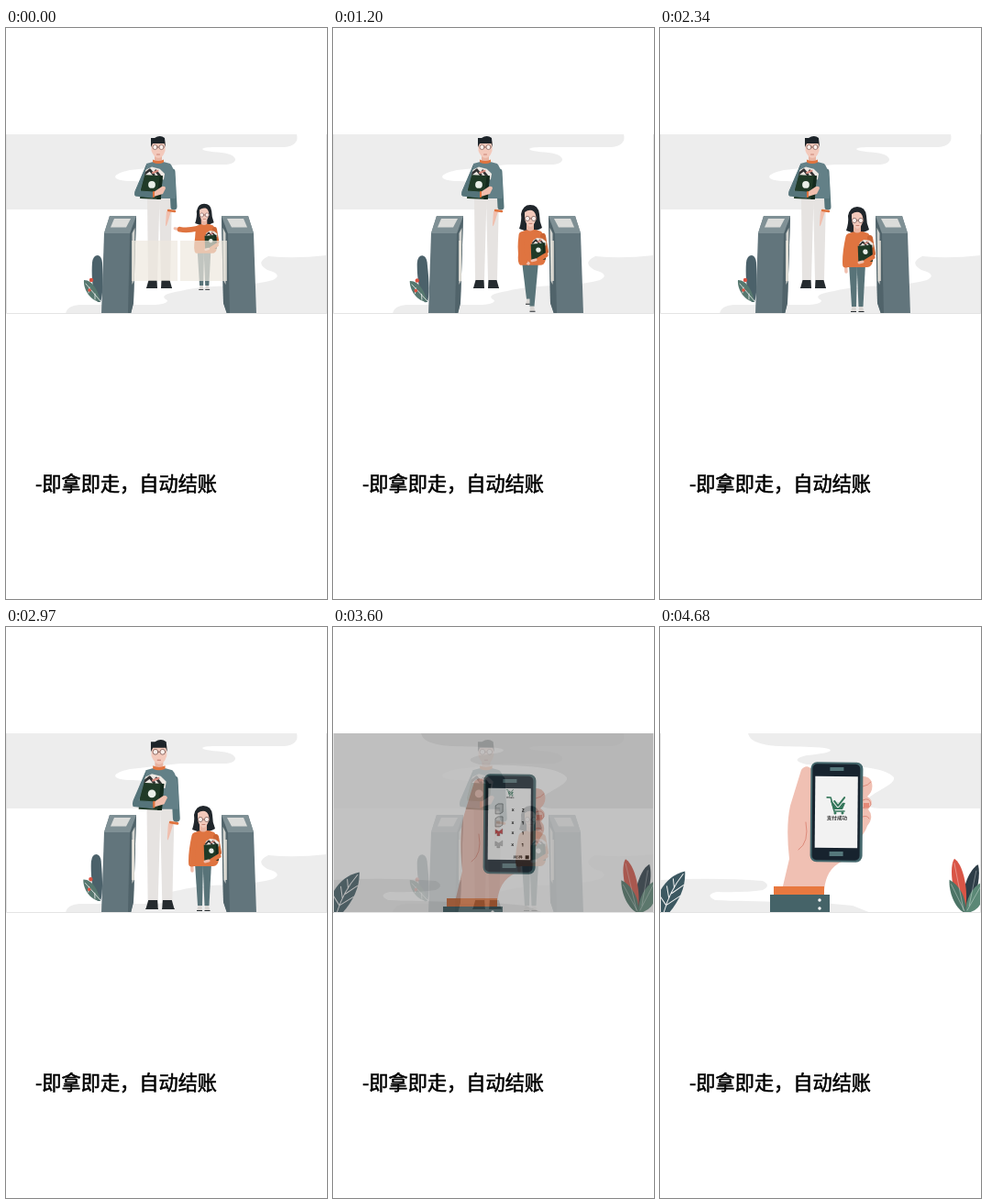
These frames come from a looping animation (350x623 px, 4740 ms). An HTML page:

```html
<!DOCTYPE html>
<html lang="zh-CN">
<head>
<meta charset="utf-8">
<style>
html, body { margin: 0; width: 100%; height: 100%; overflow: hidden; background: #fff }
svg { display: block; width: 350px; height: 623px }
.line { fill: none; stroke-linecap: round; stroke-linejoin: round }
.caption { font: 500 21.2px "Noto Sans CJK SC", "Noto Sans CJK", sans-serif; stroke: #000; stroke-width: .55 }
.tiny { font: 700 5.6px "Noto Serif", "Noto Sans CJK SC", serif; text-anchor: middle }
.count { font: 700 5px "Noto Sans", sans-serif; text-anchor: middle }
</style>
</head>
<body>
<svg viewBox="0 0 350 623">
<defs>
  <clipPath id="view"><rect y="116" width="350" height="196"/></clipPath>
  <g id="bag">
    <path d="M-9-10l3-6 6-3 8 2 5 5-1 6z" fill="#eee9e4"/>
    <path d="M-7-12l5-4 4 5M4-15l4 5" class="line" stroke="#333" stroke-width="2.5"/>
    <path d="M1-13l5-2" class="line" stroke="#d88c80" stroke-width="2"/>
    <path d="M-10-11l21 1-2 24-21-1z" fill="#203a27"/>
    <path d="M8-10h3l-2 24h-4z" fill="#142a1d"/>
    <circle cy="-1" r="3.6" fill="#e9eee8"/>
  </g>
  <g id="glasses" class="line" stroke="#86625c" stroke-width=".8">
    <circle cx="-3.5" r="2.6" fill="#fff" fill-opacity=".7"/><circle cx="3.5" r="2.6" fill="#fff" fill-opacity=".7"/><path d="M-.9 0h1.8"/>
  </g>
</defs>

<g clip-path="url(#view)">
  <rect y="116" width="350" height="196"/>

  <g id="store">
    <rect y="116" width="350" height="196" fill="#fff"/>
    <g fill="#ededed">
      <path d="M0 116H317Q320 128 304 130H225C205 131 215 135 235 136C255 138 254 149 238 149H190C170 151 155 153 135 155C112 160 115 167 138 167Q170 168 175 180L170 198H0z"/>
      <path d="M350 248Q315 252 286 249Q271 256 285 264Q303 269 291 275C265 283 223 279 190 287Q164 291 176 297Q176 302 158 302H80Q66 303 65 312H350z"/>
    </g>
    <g id="plant">
      <path d="M100 299C94 290 93 268 94 256Q95 248 100 248Q105 249 105 258C106 275 106 290 103 299z" fill="#4b616a"/>
      <path d="M103 299C92 298 84 285 85 275C95 275 101 288 103 299z" fill="#56786f"/>
      <path d="M87 279L103 298M90 289l1-6M97 296v-6" class="line" stroke="#eee" stroke-width=".8"/>
      <circle cx="93" cy="275" r="2.2" fill="#dd5140"/><circle cx="91" cy="286" r="1.8" fill="#dd5140"/>
    </g>
    <g>
      <path d="M113 205H142L139 300 136 312H104L107 224z" fill="#62757c"/>
      <path d="M135 224L142 205 139 300 136 312H133z" fill="#50636a"/>
      <path d="M113 205H142L135 224H107z" fill="#7f9095"/>
      <path d="M118 208H136L131 217.5H114z" fill="#dbdcda"/>
      <path d="M137.5 224l3-6-1 58-2 4z" fill="#d2d3cf"/>
      <path d="M235 205H264L270 224 273 312H241L237 300z" fill="#62757c"/>
      <path d="M235 205L242 224 244 312H241L237 300z" fill="#50636a"/>
      <path d="M235 205H264L270 224H242z" fill="#7f9095"/>
      <path d="M241 208H259L263 217.5H246z" fill="#dbdcda"/>
      <path d="M236.5 218l3 6v56l-2-4z" fill="#d2d3cf"/>
    </g>

    <g id="man">
      <g id="manLegs" fill="#e6e3e1"></g>
      <path d="M181 157L183 195" class="line" stroke="#55747a" stroke-width="7"/>
      <path d="M180 200l-4 13q-2 6-2 1l1-14z" fill="#f0bfae"/>
      <path d="M177 199l7 1" class="line" stroke="#e0743f" stroke-width="2.5"/>
      <path d="M153 148Q166 143 179 148Q186 155 185 186H152L150 164z" fill="#638087"/>
      <path d="M162 138h8v7q-4 3-8 0z" fill="#e9b4a2"/>
      <path d="M160 143.5q6 3 12 0v3q-6 3-12 0z" fill="#e0743f"/>
      <path d="M158.500 124H173.500V134Q171 142 166 142Q161 141 158.500 134z" fill="#f3c9bb"/>
      <path d="M158 130V120L162 120Q168 116 173 120L174 130 172.500 126 160 126z" fill="#1d2429"/>
      <use href="#glasses" x="166" y="130"/>
      <path d="M164.500 138h3" class="line" stroke="#bd7063" stroke-width=".8"/>
      <use href="#bag" transform="translate(159 172) scale(1.08)"/>
      <path d="M153 150L150 163 146 178 160 179V185L141 183Q140 181 141 178z" fill="#55747a" stroke="#55747a" stroke-linejoin="round"/>
      <path d="M161 179l9-6q4-1 4 2l-3 6-10 3z" fill="#f0bfae"/>
      <path d="M161 179v5" class="line" stroke="#e0743f" stroke-width="2"/>
    </g>

    <g id="girl">
      <g id="girlLegs" fill="#587378"></g>
      <path d="M203 221Q206 212 205 205Q207 195 215 195Q224 195 225 205Q225 213 228 220Q216 227 203 221z" fill="#20262b"/>
      <path d="M204 225Q215 219 227 224Q234 231 232 254Q231 261 226 261H204Q200 258 203 240z" fill="#df7440"/>
      <path d="M211 215h8v7q-4 3-8 0z" fill="#eab5a3"/>
      <path d="M209 203Q213 200 217 201Q221.500 203 221.500 210Q219 219 215 219Q210 217 209 209z" fill="#f3c9bb"/>
      <use href="#glasses" x="215.5" y="210"/>
      <path d="M214 215.500h3" class="line" stroke="#bd7063" stroke-width=".8"/>
      <path d="M229 229L232 246" class="line" stroke="#cc6534" stroke-width="6"/>
      <use href="#bag" transform="translate(224 245) rotate(-7) scale(.74)"/>
      <path d="M232 250L224 255" class="line" stroke="#df7440" stroke-width="5"/>
      <path d="M221 255l-4 1" class="line" stroke="#f0bfae" stroke-width="3"/>
      <path id="hand" class="line" stroke="#f0bfae" stroke-width="3.5"/>
      <path id="sleeve" class="line" stroke="#df7440" stroke-width="7"/>
    </g>

    <g fill="#eee9df" fill-opacity=".7">
      <rect id="doorL" x="137" y="232" height="44"/>
      <rect id="doorR" y="232" height="44"/>
    </g>
  </g>

  <g id="pay">
    <rect y="116" width="350" height="196" fill="#fff"/>
    <g fill="#ededed">
      <path d="M96 116H350V198H240Q222 198 226 188C236 178 257 172 255 164C245 153 215 151 160 150Q139 145 160 140C192 137 195 132 165 131C135 130 99 132 96 116z"/>
      <path d="M0 276Q60 273 112 277Q122 282 112 287Q92 290 62 289Q48 292 60 298C100 300 170 299 210 304L230 312H0z"/>
    </g>
    <g id="leafL">
      <path d="M0 312V289Q10 271 28 267Q29 290 10 312z" fill="#3c5861"/>
      <path d="M4 312Q11 288 26 270M10 296L8 283M16 285L15 275M7 304L0 293M8 303L22 294M13 291L26 282" class="line" stroke="#f3f3f3"/>
    </g>
    <g id="leafR">
      <path d="M333 312C325 300 333 266 346 259C350 275 343 299 333 312z" fill="#2d3d47"/>
      <path d="M332 312C320 300 313 263 320 253C331 260 337 293 332 312z" fill="#d95546"/>
      <path d="M333 312C322 309 314 289 315 276C327 282 335 298 333 312z" fill="#4c7466"/>
      <path d="M333 312C333 295 341 282 352 277V296Q347 311 333 312z" fill="#5b8876"/>
      <path d="M320 258L331 309M317 281L332 310M335 309L350 281M337 304L344 266" class="line" stroke="#fff" stroke-opacity=".45" stroke-width=".8"/>
    </g>
    <g id="phone">
      <path d="M133 287L141 253Q137 218 142 195L154 156Q160 148 167 157L215 163Q229 161 231 170Q233 179 226 185Q235 190 227 199Q234 207 226 217Q224 224 215 234L198 256Q181 264 179 287z" fill="#f0c0b3"/>
      <path d="M151 243Q163 235 159 213M221 189Q229 185 230 194Q226 200 221 197M221 207q5-2 7 2M221 174q6-1 9-5" class="line" stroke="#de8b7b"/>
      <path d="M222 192h6v5h-6z" fill="#e58977"/>
      <path d="M124 283H179V294H124z" fill="#e8783f"/>
      <path d="M120 292H185V480H120z" fill="#456368"/>
      <circle cx="174" cy="298" r="1.7" fill="#fff"/><circle cx="174" cy="307" r="1.7" fill="#fff"/>
      <g transform="rotate(.5 193 202)">
        <rect x="164" y="147.5" width="57" height="109" rx="7" fill="#45686d"/>
        <rect x="166" y="149.5" width="52" height="105" rx="5" fill="#17232e"/>
        <path d="M185 153h15v4h-15zM185 245h15v5h-15z" fill="#55777b"/>
        <rect id="screen" x="169" y="163" width="46.5" height="78"/>
        <g id="list">
          <g id="rows"></g>
          <text x="202" y="239.5" class="tiny" style="font-size:4px">共5件</text>
          <path d="M210 236h4v4h-4z" fill="#222"/>
        </g>
        <g id="success">
          <path d="M-11-9h4l4 15H8" class="line" stroke="#35775b" stroke-width="1.6"/>
          <path d="M-7-5L9-3 6 4H-4z" fill="#35775b"/>
          <path d="M-3-5L1 0 8-9" class="line" stroke="#f3f3f1" stroke-width="4"/>
          <path d="M-3-5L1 0 8-9" class="line" stroke="#35775b" stroke-width="2"/>
          <circle cx="-2" cy="8" r="1.5" fill="#35775b"/><circle cx="6" cy="8" r="1.5" fill="#35775b"/>
          <text y="15.5" class="tiny" fill="#333">支付成功</text>
        </g>
      </g>
    </g>
  </g>
  <path d="M.5 116V311.5H349.5V116" class="line" stroke="#e4e4e4"/>
</g>
<text x="32" y="504.8" class="caption">-即拿即走，自动结账</text>
</svg>

<script>
const LOOP = 4740;
const $ = id => document.getElementById(id);
const set = (id, attrs) => { for (const k in attrs) $(id).setAttribute(k, attrs[k]); };
const lerp = (a, b, p) => a + (b - a) * p;
const ramp = (t, a, b) => Math.min(1, Math.max(0, (t - a) / (b - a)));
const ease = (t, a, b) => { const p = ramp(t, a, b); return p * p * (3 - 2 * p); };

const items = [[187, '#ddd', 2], [201, '#ddd', 1], [212, '#c9383c', 1], [225, '#bbb', 1]];
$('rows').innerHTML = items.map(([y, color, n], i) => {
  const icon = i < 2
    ? `<path d="M177 ${y - 5}l3-2h5v9l-3 2h-5z" fill="${color}" stroke="#555" stroke-width=".6"/><path d="M178 ${y - 2}h4m-4 2h4" stroke="#888" stroke-width=".6"/>`
    : `<path d="M177 ${y - 4}l4 2 4-3v6l-3-1v3h-3v-3l-2 1z" fill="${color}" stroke="#666" stroke-width=".3"/>`;
  return `${icon}<text class="count" x="196" y="${y + 1}">x</text><text class="count" x="207" y="${y + 1.5}">${n}</text>`;
}).join('');

const manBody = { id: 'manLegs', hipY: 184, footY: 284, shoe: '#252b2f', height: 9, toe: 2,
  sides: [[154, 167.5, 155, 165, -1], [167, 181, 169, 179, 1]] };
const girlBody = { id: 'girlLegs', hipY: 257, footY: 310, shoe: '#d9d6d3', height: 6, toe: 1,
  sides: [[206, 215, 209, 214, -1], [214.5, 224, 216.5, 221.5, 1]] };

// Each foot lifts on its own half of the step cycle.
function drawLegs({ id, hipY, footY, shoe, height, toe, sides }, swing, lift) {
  $(id).innerHTML = sides.map(([hipL, hipR, left, right, out]) => {
    const y = footY - lift * Math.max(0, -out * swing);
    const shift = -out * Math.abs(swing) * 2;
    const l = left + shift, r = right + shift;
    const toeL = out < 0 ? l - toe : l, toeR = out > 0 ? r + toe : r;
    return `<path d="M${hipL} ${hipY}H${hipR}L${r} ${y - height}H${l}z"/>
      <path d="M${l + .5} ${y - height}H${r - .5}L${toeR} ${y}H${toeL}z" fill="${shoe}"/>
      <path d="M${toeL} ${y - 1}H${toeR}v1H${toeL}z" fill="#252b2f"/>`;
  }).join('');
}

const walk = (t, from, to, step) =>
  t > from && t < to ? Math.sin((t - from) / step * Math.PI) : 0;

const grow = (x, y, x0, y0, s) => `translate(${x} ${y}) scale(${s}) translate(${-x0} ${-y0})`;

function draw(t) {
  const closed = 1 - ease(t, 120, 540);
  set('doorL', { width: 3 + 47 * closed });
  set('doorR', { width: 3 + 48 * closed, x: 238 - 48 * closed });

  const g = ease(t, 450, 1250);
  const step = walk(t, 500, 1620, 280);
  const bob = 2 * Math.abs(step);
  set('girl', { transform: grow(lerp(216, 215, g), lerp(286, 310, g) - bob, 215, 310, lerp(.82, 1, g)) });
  drawLegs({ ...girlBody, footY: girlBody.footY + bob }, step, 8);
  const fold = ease(t, 200, 700), drop = ease(t, 1350, 1800);
  const hx = lerp(lerp(176, 213, fold), 203, drop);
  const hy = lerp(lerp(228, 259, fold), 266, drop);
  const ex = lerp(lerp(193, 203, fold), 202, drop);
  const ey = lerp(lerp(231, 252, fold), 246, drop);
  const wx = lerp(ex, hx, .6), wy = lerp(ey, hy, .6);
  set('hand', { d: `M${wx} ${wy}L${hx} ${hy}` });
  set('sleeve', { d: `M206 228Q${ex} ${ey} ${wx} ${wy}` });

  const m = ease(t, 2370, 2760);
  set('man', { transform: grow(lerp(167, 168, m), lerp(284, 308, m), 167, 284, lerp(1, 1.115, m)) });
  drawLegs(manBody, walk(t, 2370, 2800, 215), 6);

  const sway = (1 - Math.cos(t / 2370 * 2 * Math.PI)) / 2;
  set('plant', { transform: `rotate(${-3 * sway} 103 299)` });
  set('leafL', { transform: `rotate(${2 * sway - 1} 0 312)` });
  set('leafR', { transform: `rotate(${1 - 2 * sway} 333 312)` });

  const fade = ramp(t, 3360, 3760);
  set('store', { opacity: 1 - fade });
  set('pay', { opacity: fade });

  const s = Math.max(0, t - 3470) / 1000;
  set('phone', { transform: `translate(0 ${164 * Math.exp(-12 * s) * Math.cos(9 * s)})` });

  const paid = ease(t, 4170, 4380);
  set('list', { opacity: 1 - paid });
  const shade = Math.round(lerp(254, 242, paid));
  set('screen', { fill: `rgb(${shade},${shade},${shade})` });
  set('success', { transform: `translate(193 ${lerp(168, 195, paid)}) scale(${lerp(.38, 1, paid)})` });
}

const start = performance.now();
function frame() {
  draw((performance.now() - start) % LOOP);
  requestAnimationFrame(frame);
}
frame();
</script>
</body>
</html>
```
